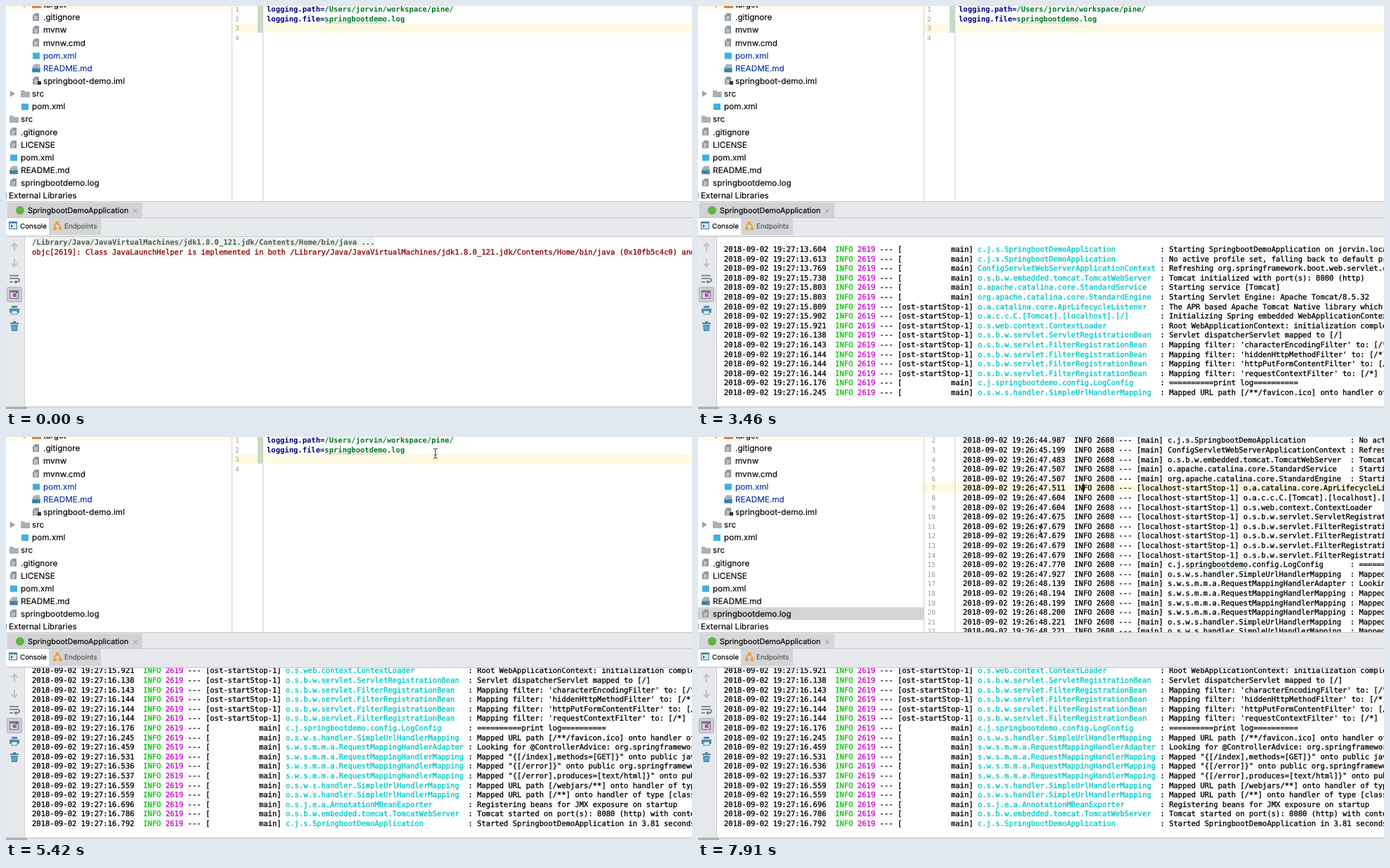
An HTML page for the animation above (8000 ms loop, 976 by 574 pixels).

```html
<!DOCTYPE html>
<html lang="en">
<head>
<meta charset="utf-8">
<title>Spring Boot log demo</title>
<style>
  html, body { margin: 0; width: 100%; height: 100%; overflow: hidden; background: #fff; }
  svg { display: block; width: 100vw; height: 100vh; }
  text { white-space: pre; text-rendering: geometricPrecision; }
  .mono { font: 10.53px "DejaVu Sans Mono", monospace; stroke-width: .3px; }
  .num { font: 9.5px "DejaVu Sans Mono", monospace; fill: #999; }
  .ui { font-family: Inter, "Open Sans", sans-serif; stroke-width: .15px; }
  .bold { font-weight: bold; stroke-width: 0; }
</style>
</head>
<body>
<svg id="stage" viewBox="0 0 976 574">
  <defs>
    <clipPath id="consoleClip"><rect x="27" y="329" width="949" height="241"/></clipPath>
    <clipPath id="editorClip"><rect x="322" width="654" height="278"/></clipPath>
    <g id="doc">
      <path d="M3.5 0H10V11H1V3Z" fill="#8d969d"/>
      <path d="M1 3H3.8V0Z" fill="#c3c9cd"/>
      <path d="M3 5H8M3 7H8M3 9H7" stroke="#e9ecee"/>
    </g>
    <g id="md">
      <path d="M4 0H11V7H1V3Z" fill="#a9b2b8"/>
      <rect y="5" width="12" height="7" fill="#6fb5d6"/>
      <text x="0.8" y="11" font-family="Inter, sans-serif" font-size="6.5" font-weight="bold" fill="#22536d">MD</text>
    </g>
    <g id="pom"><rect x="1" y="2" width="10" height="9" fill="#3fb0dc"/></g>
    <g id="folder"><path d="M0 1H5L6.5 3H13V11H0Z" fill="#a7b1b9"/></g>
    <g id="target"><path d="M0 1H5L6.5 3H13V11H0Z" fill="#e0853d"/></g>
  </defs>
  <rect width="976" height="574" fill="#fff"/>
  <g id="tree">
    <rect width="321" height="6" fill="#fffbe9"/>
    <rect id="picked" y="242.5" width="321" height="18" fill="#d4d4d4"/>
  </g>
  <g id="editor" clip-path="url(#editorClip)">
    <rect id="gutter" x="322" y="91" width="43" height="160" fill="#efefef"/>
    <rect id="current" x="322" width="654" height="13.6" fill="#fffae3"/>
    <g id="props"><rect x="358" width="7" height="38" fill="#c4dbc4"/></g>
    <g id="log"></g>
  </g>
  <path d="M321.5 0V278M365.5 0V278" stroke="#cfcfcf"/>
  <g id="panel">
    <rect y="278" width="976" height="51" fill="#e7e9ed"/>
    <rect id="tab" x="2" y="280" width="192" height="21"/>
    <rect y="302" width="61" height="24" fill="#fff"/>
    <rect x="61" y="302" width="74" height="24" fill="#d3d4d7"/>
    <path d="M0 278.5H976M0 301.5H976M0 328.5H976" stroke="#c5c7ca"/>
    <circle cx="20" cy="291" r="6" fill="#62b543"/>
    <path d="M181 289L187 295M187 289L181 295" stroke="#999"/>
    <rect x="4.5" y="307.5" width="11" height="10" fill="#d9e9f3" stroke="#3c78a0"/>
    <path d="M4 308.5H16" stroke="#3c78a0" stroke-width="2"/>
    <path d="M7 311L10 313.5L7 316Z" fill="#315f80"/>
    <path d="M69.5 317V312L73 309L77 313V317" fill="none" stroke="#e99a2f" stroke-width="1.6"/>
    <g fill="#f0a030"><circle cx="73" cy="309" r="2.5"/><circle cx="69.5" cy="317" r="2.5"/><circle cx="77" cy="317" r="2.5"/></g>
    <rect y="329" width="27" height="242" fill="#e7e9ec"/>
    <path d="M26.5 329V571" stroke="#c8cacc"/>
    <rect x="1.5" y="400.5" width="21" height="21" rx="2" fill="#cacccf" stroke="#b2b4b7"/>
    <path d="M12 349V339M8 342.5L12 338L16 342.5M12 360V370M8 366.5L12 371L16 366.5" fill="none" stroke="#bfc1c3" stroke-width="2"/>
    <path d="M5 384H18M5 388H16Q19 388 19 390.5T16 393H13M5 393H10M15 391L12.5 393L15 395" fill="none" stroke="#62707a" stroke-width="1.4"/>
    <rect x="5.5" y="405.5" width="12" height="11" fill="#d9cde0" stroke="#77727d"/>
    <path d="M5 407H18" stroke="#77727d" stroke-width="2"/>
    <path d="M17 406L12 412M11 409V413H15" fill="none" stroke="#9a45a6" stroke-width="1.8"/>
    <path d="M8 427H16V430H8ZM5 431H19V437H5Z" fill="#4b8bad"/>
    <rect x="8" y="434" width="8" height="5" fill="#e8f2f7" stroke="#4b8bad"/>
    <path d="M6 452H18M10 450H14" stroke="#3e83a8" stroke-width="2"/>
    <path d="M7 454H17L16 463H8Z" fill="#4791b6"/>
    <path d="M10 456V461M12 456V461M14 456V461" stroke="#9bc7dc" stroke-width=".8"/>
  </g>
  <g clip-path="url(#consoleClip)"><g id="console"></g></g>
  <rect y="570.5" width="976" height="4" fill="#e3e4e6"/>
  <path d="M0 571H976" stroke="#bfc1c3"/>
  <rect y="571" width="30" height="3" fill="#aeb0b2"/>
  <g id="arrow"><path d="M0 0V15.5L3.6 12.3L6.2 18L8.6 17L6.1 11.5H10.8Z" fill="#000" stroke="#fff" stroke-width=".8"/></g>
  <g id="beam"><path d="M-3-7Q0-7 0-5Q0-7 3-7M0-5V5M-3 7Q0 7 0 5Q0 7 3 7M-1.5 2H1.5" fill="none" stroke="#333"/></g>
</svg>
<script>
const LOOP = 8000, ROW = 13.6, CHAR = 6.34;
const NS = 'http://www.w3.org/2000/svg';
const $ = id => document.getElementById(id);

function add(parent, tag, attrs, content) {
  const el = document.createElementNS(NS, tag);
  for (const key in attrs) el.setAttribute(key, attrs[key]);
  if (content) el.textContent = content;
  return parent.appendChild(el);
}

// Each run is [string, colour]; a hairline stroke gives the heavier screen weight.
function runs(parent, x, y, parts, cls = 'mono') {
  const line = add(parent, 'text', { x, y, class: cls });
  parts.forEach(([str, fill]) => add(line, 'tspan', { fill, stroke: fill }, str));
  return line;
}

function label(parent, x, y, str, size, fill = '#000') {
  add(parent, 'text', { x, y, class: 'ui', 'font-size': size, fill, stroke: fill }, str);
}

function wave(parent, x, y, width) {
  let d = `M${x} ${y}`;
  for (let i = 0; i < width / 4; i++) d += 'l2-1.2l2 1.2';
  add(parent, 'path', { d, fill: 'none', stroke: '#69ad69', 'stroke-width': 0.7 });
}

// Project tree: indent, icon, name, colour
const files = [
  [53, 'target', 'target'], [53, 'doc', '.gitignore'], [53, 'doc', 'mvnw'], [53, 'doc', 'mvnw.cmd'],
  [53, 'pom', 'pom.xml', '#0a2fa8'], [53, 'md', 'README.md', '#0a2fa8'], [53, 'doc', 'springboot-demo.iml'],
  [37, 'folder', 'src'], [37, 'pom', 'pom.xml'], [21, 'folder', 'src'], [21, 'doc', '.gitignore'],
  [21, 'doc', 'LICENSE'], [21, 'pom', 'pom.xml'], [21, 'md', 'README.md'],
  [21, 'doc', 'springbootdemo.log'], [4, '', 'External Libraries']
];
const tree = $('tree');
files.forEach(([x, icon, name, fill], i) => {
  const mid = -2 + i * 18.13;
  if (icon) add(tree, 'use', { href: '#' + icon, x: x - 16, y: mid - 6 });
  label(tree, x, mid + 4.2, name, 11.75, fill);
});
add(tree, 'path', { d: 'M6 120.5L13 125L6 129.5Z M22-3H30L26 2Z', fill: '#a0a0a0' });
add(tree, 'path', { d: 'M0 266V274', stroke: '#777', 'stroke-width': 1.5 });
add(tree, 'rect', { x: 45, y: 107, width: 5, height: 5, fill: '#333' });

const panel = $('panel');
label(panel, 31, 294.8, 'SpringbootDemoApplication', 10.8);
label(panel, 20, 316.6, 'Console', 9.8);
label(panel, 83, 316.6, 'Endpoints', 9.9, '#555');

// Properties file
const props = $('props');
const navy = '#000080', green = '#00781e';
runs(props, 371, 8.2, [['logging.path=', navy], ['/Users/jorvin/workspace/pine/', green]], 'mono bold');
runs(props, 371, 21.8, [['logging.file=', navy], ['springbootdemo.log', green]], 'mono bold');
wave(props, 453.5, 24.6, 88);
for (let n = 1; n < 5; n++) add(props, 'text', { x: 326, y: 8 + (n - 1) * ROW, class: 'num' }, n);

// Log records: console time, file time, on startup thread, logger, message
const app = 'c.j.s.SpringbootDemoApplication';
const tomcat = 'o.s.b.w.embedded.tomcat.TomcatWebServer';
const filter = 'o.s.b.w.servlet.FilterRegistrationBean';
const url = 'o.s.w.s.handler.SimpleUrlHandlerMapping';
const mapping = 's.w.s.m.m.a.RequestMappingHandlerMapping';
const records = [
  ['13.604', '44.980', 0, app, 'Starting SpringbootDemoApplication on jorvin.local with PID'],
  ['13.613', '44.987', 0, app, 'No active profile set, falling back to default profiles'],
  ['13.769', '45.199', 0, 'ConfigServletWebServerApplicationContext', 'Refreshing org.springframework.boot.web.servlet.context'],
  ['15.738', '47.483', 0, tomcat, 'Tomcat initialized with port(s): 8080 (http)'],
  ['15.803', '47.507', 0, 'o.apache.catalina.core.StandardService', 'Starting service [Tomcat]'],
  ['15.803', '47.507', 0, 'org.apache.catalina.core.StandardEngine', 'Starting Servlet Engine: Apache Tomcat/8.5.32'],
  ['15.809', '47.511', 1, 'o.a.catalina.core.AprLifecycleListener', 'The APR based Apache Tomcat Native library which allows'],
  ['15.902', '47.604', 1, 'o.a.c.c.C.[Tomcat].[localhost].[/]', 'Initializing Spring embedded WebApplicationContext'],
  ['15.921', '47.604', 1, 'o.s.web.context.ContextLoader', 'Root WebApplicationContext: initialization completed'],
  ['16.138', '47.675', 1, 'o.s.b.w.servlet.ServletRegistrationBean', 'Servlet dispatcherServlet mapped to [/]'],
  ['16.143', '47.679', 1, filter, "Mapping filter: 'characterEncodingFilter' to: [/*]"],
  ['16.144', '47.679', 1, filter, "Mapping filter: 'hiddenHttpMethodFilter' to: [/*]"],
  ['16.144', '47.679', 1, filter, "Mapping filter: 'httpPutFormContentFilter' to: [/*]"],
  ['16.144', '47.679', 1, filter, "Mapping filter: 'requestContextFilter' to: [/*]"],
  ['16.176', '47.770', 0, 'c.j.springbootdemo.config.LogConfig', '==========print log=========='],
  ['16.245', '47.927', 0, url, 'Mapped URL path [/**/favicon.ico] onto handler of type'],
  ['16.459', '48.139', 0, 's.w.s.m.m.a.RequestMappingHandlerAdapter', 'Looking for @ControllerAdvice: org.springframework.boot'],
  ['16.531', '48.194', 0, mapping, 'Mapped "{[/index],methods=[GET]}" onto public java.lang'],
  ['16.536', '48.199', 0, mapping, 'Mapped "{[/error]}" onto public org.springframework.http'],
  ['16.537', '48.200', 0, mapping, 'Mapped "{[/error],produces=[text/html]}" onto public org'],
  ['16.559', '48.221', 0, url, 'Mapped URL path [/webjars/**] onto handler of type'],
  ['16.559', '48.221', 0, url, 'Mapped URL path [/**] onto handler of type [class org'],
  ['16.696', '', 0, 'o.s.j.e.a.AnnotationMBeanExporter', 'Registering beans for JMX exposure on startup'],
  ['16.786', '', 0, tomcat, 'Tomcat started on port(s): 8080 (http) with context path'],
  ['16.792', '', 0, app, 'Started SpringbootDemoApplication in 3.81 seconds (JVM']
];

// Console
const con = $('console');
const black = '#000', lime = '#00c800', cyan = '#00c5c5', magenta = '#cd00cd';
const rowY = k => 340.2 + k * ROW;
const java = '/Library/Java/JavaVirtualMachines/jdk1.8.0_121.jdk/Contents/Home/bin/java ';
add(con, 'rect', { x: 37, y: 329.5, width: 488, height: 13.6, fill: '#e9f3e9' });
runs(con, 37, rowY(0), [[java + '...', '#555']], 'mono bold');
runs(con, 37, rowY(1), [['objc[2619]: Class JavaLaunchHelper is implemented in both ' + java + '(0x10fb5c4c0) and', '#8b0000']]);

const banner = add(con, 'g', {});
String.raw`
  .   ____          _            __ _ _
 /\\ / ___'_ __ _ _(_)_ __  __ _ \ \ \ \
( ( )\___ | '_ | '_| | '_ \/ _${'`'} | \ \ \ \
 \\/  ___)| |_)| | | | | || (_| |  ) ) ) )
  '  |____| .__|_| |_|_| |_\__, | / / / /
 =========|_|==============|___/=/_/_/_/`
  .split('\n').slice(1).forEach((str, i) => runs(banner, 37, rowY(3 + i), [[str, black]]));
runs(banner, 37, rowY(9), [[' :: Spring Boot :: ', lime], ['       (v2.0.4.RELEASE)', black]]);

const FIRST = 11;
const lines = records.map(([time, , startup, logger, msg], i) => runs(con, 37, rowY(FIRST + i), [
  [`2018-09-02 19:27:${time}  `, black], ['INFO', lime], [' 2619', magenta],
  [` --- [${(startup ? 'ost-startStop-1' : 'main').padStart(15)}] `, black],
  [logger.padEnd(40), cyan], [` : ${msg}`, black]
]));

// Opened log file
const log = $('log');
const logY = n => 8.3 + (n - 2) * ROW;
records.slice(0, 22).forEach(([, time, startup, logger, msg], i) => {
  const n = i + 1, thread = startup ? 'localhost-startStop-1' : 'main';
  add(log, 'text', { x: 338, y: logY(n), class: 'num', 'text-anchor': 'end' }, n);
  runs(log, 377, logY(n), [[`2018-09-02 19:26:${time}  INFO 2608 --- [${thread}] ${logger.padEnd(40)} : ${msg}`, black]]);
});
wave(log, 377 + 50 * CHAR, logY(15) + 2.8, 88);
add(log, 'rect', { x: 547.5, y: logY(7) - 10, width: 1.6, height: 13, fill: black });

// Timeline: [start, records shown]
const output = [[0, 0], [970, 3], [2990, 9], [3290, 14], [3460, 16], [3610, 17], [3760, 22], [3900, 25]];
// [start, x, y, shape]
const pointer = [
  [6300, 205, 217, 'arrow'], [6450, 189, 231, 'arrow'], [6740, 134, 239, 'arrow'],
  [6890, 122, 244, 'arrow'], [7040, 118, 246, 'arrow'], [7720, 300, 200, 'arrow'], [7910, 487, 133, 'beam']
];
const at = (keys, t) => keys.filter(key => key[0] <= t).pop();

function pointerAt(t) {
  if (t < 5130) return null;
  if (t >= 6300) return at(pointer, t);
  const u = Math.min(7, Math.floor((t - 5130) / 147)) / 7;
  const ease = u * u * (3 - 2 * u);
  return [t, 614 - 55 * ease, 19 + 79 * ease, 'beam'];
}

const show = (el, on) => el.setAttribute('visibility', on ? 'visible' : 'hidden');

function render(t) {
  const count = at(output, t)[1];
  show(banner, t >= 600);
  lines.forEach((line, i) => show(line, i < count));
  const scroll = Math.max(0, rowY(FIRST + count - 1) - 554);
  con.setAttribute('transform', `translate(0 ${-scroll})`);

  const picked = t >= 7340, opened = t >= 7530;
  show($('picked'), picked);
  $('tab').setAttribute('fill', picked ? '#d6d7da' : '#d0d2d6');
  show(props, !opened);
  show(log, opened);
  show($('gutter'), t >= 6300 && !opened);
  $('current').setAttribute('y', opened ? 65.5 : 24.6);

  const p = pointerAt(t);
  for (const shape of ['arrow', 'beam']) {
    show($(shape), p && p[3] === shape);
    if (p) $(shape).setAttribute('transform', `translate(${p[1]} ${p[2]})`);
  }
}

const start = performance.now();
(function tick() {
  render((performance.now() - start) % LOOP);
  requestAnimationFrame(tick);
})();
</script>
</body>
</html>
```
